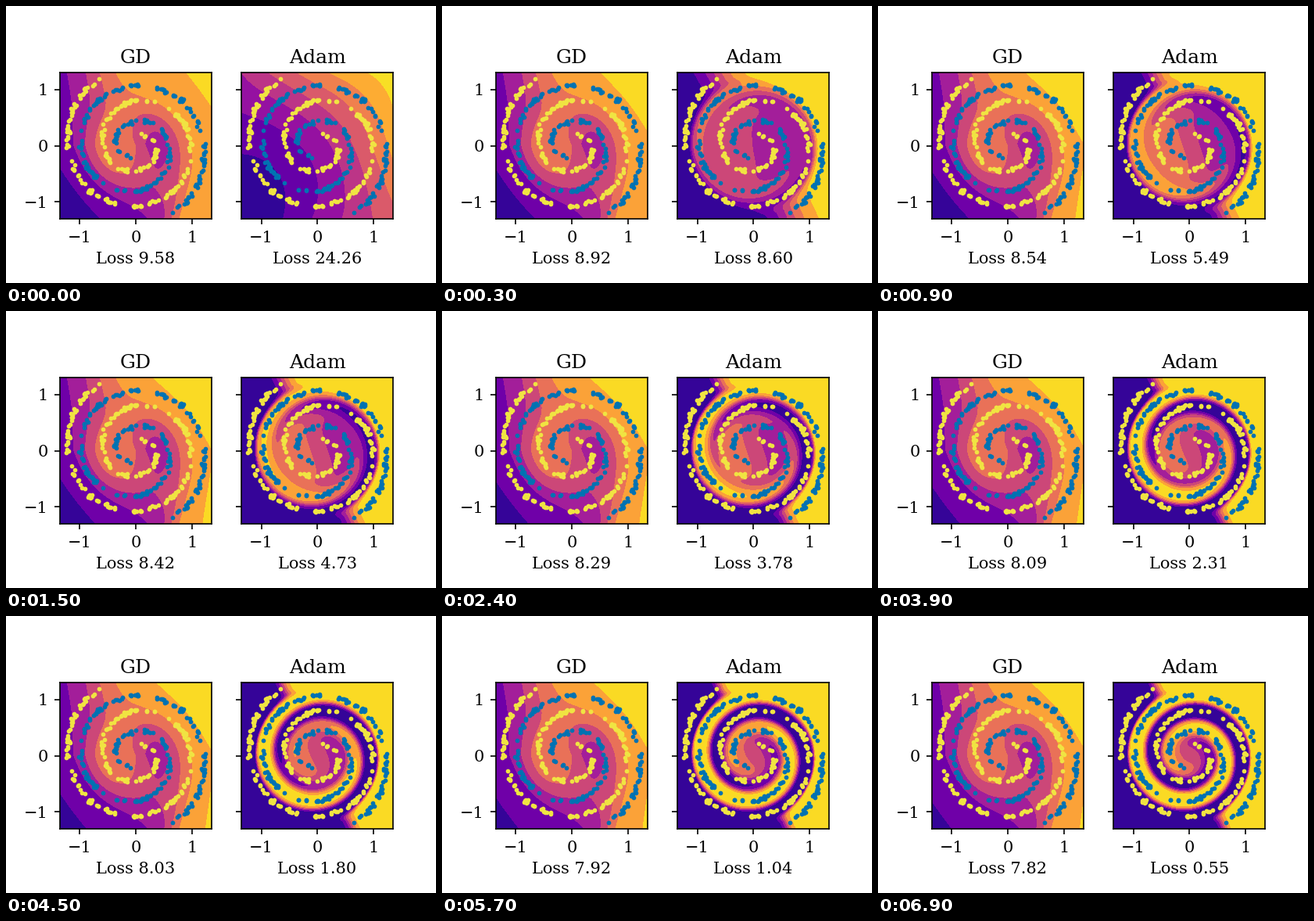
Write a matplotlib script that moves like this. It is 550 px wide and 354 px high and loops after 7200 ms.

```python
import numpy as np
import matplotlib.pyplot as plt
from matplotlib.animation import FuncAnimation

plt.rcParams["font.family"] = "DejaVu Serif"

FRAMES, INTERVAL, DPI = 24, 300, 150
XLIM, YLIM = (-1.354, 1.346), (-1.303, 1.297)
YELLOW, BLUE = "#F0E442", "#0072B2"

# Spiral: radius grows by TURN for each clockwise turn from the top
START, TURN, END = 0.16, 0.625, np.radians(692)

KEYS = [0, 1, 3, 5, 11, 15, 19, 23]
GD_LOSS = [9.58, 8.92, 8.54, 8.42, 8.16, 8.03, 7.92, 7.82]
ADAM_LOSS = [24.26, 8.6, 5.49, 4.73, 2.82, 1.80, 1.04, 0.55]


def sigmoid(z):
    return 1 / (1 + np.exp(-z))


def smoothstep(a, b, v):
    t = np.clip((v - a) / (b - a), 0, 1)
    return t * t * (3 - 2 * t)


def spiral_points(n=200):
    rng = np.random.default_rng(4)
    t = END * rng.random(n) ** 0.7
    r = START + TURN * t / (2 * np.pi) + rng.normal(0, 0.018, n)
    r += 0.04 * np.sin(t) + 0.02 * np.cos(t)
    return r * np.sin(t), r * np.cos(t)


X, Y = np.meshgrid(np.linspace(*XLIM, 120), np.linspace(*YLIM, 120))
R = np.hypot(X, Y)
BEARING = np.arctan2(X, Y)
PHASE = BEARING - 2 * np.pi * (R - START) / TURN


def gd_logits():
    u = 0.3 + 1.1 * X + 1.1 * Y + 0.1 * X**3
    lobe = 1.25 * np.exp(-((R - 0.5) / 0.45) ** 2)
    u -= lobe * np.cos(BEARING - np.radians(70))
    # lower the upper left, raise the lower right
    u -= 0.85 * np.maximum(Y, 0) * sigmoid(-(X + 0.6) / 0.2)
    ridge = sigmoid((X - 0.65 - 0.45 * (Y + 1.3)) / 0.1)
    return u + 1.3 * np.maximum(-Y, 0) * ridge


def adam_start():
    """First Adam surface, in units of colour bands."""
    v = 2.5 + 1.9 * X + 1.35 * Y + 0.69 * X**2 + 0.85 * Y**2
    v -= 0.45 * X**2 * Y**2
    return v - 0.3 * np.maximum(X, 0) * np.maximum(Y, 0)


def adam_logits(loss):
    """The spiral is learnt from the outside in as the loss falls."""
    loss = min(loss, 6)
    reach = 0.25 + 0.65 * np.sqrt(loss / 6)
    gate = sigmoid((R - reach) / 0.1)
    slope = (0.95 * X + 0.3 * Y) * np.exp(-0.4 * R**2)
    arms = -(5 - 0.5 * loss) * np.cos(PHASE)
    inner = (0.15 - 2.1 * slope) * (1 - gate) + arms * gate
    outer = -(21 - 2.2 * loss) * R * np.sin(BEARING - np.radians(154))
    w = smoothstep(1.06, 1.28, R)
    return inner * (1 - w) + outer * w


GD, FIRST = gd_logits(), adam_start()
CUTS = np.log([p / (1 - p) for p in (0.15, 0.3, 0.45, 0.6, 0.75, 0.9)])


def gd_surface(i, loss):
    # the two outermost bands shrink slowly
    cuts = CUTS.copy()
    cuts[0] -= 0.1 + 0.5 * i / FRAMES
    cuts[-1] += 0.8 * np.exp(-i) - 0.2 * (1 - i / FRAMES)
    return GD, cuts


def adam_surface(i, loss):
    if i == 0:
        return FIRST, np.arange(1, 8)
    mix = max(0, 1 - i / 3) ** 2
    u = mix * 0.45 * (FIRST - 4) + (1 - mix) * adam_logits(loss)
    return sigmoid(u), sigmoid(CUTS)


fig, axes = plt.subplots(1, 2, sharey=True, figsize=(550 / DPI, 354 / DPI),
                         dpi=DPI)
px, py = spiral_points()
for ax, name in zip(axes, ("GD", "Adam")):
    ax.set_title(name)
    ax.set(aspect="equal", xlim=XLIM, ylim=YLIM,
           xticks=[-1, 0, 1], yticks=[-1, 0, 1])
    ax.set_autoscale_on(False)
    for sign, color in ((1, YELLOW), (-1, BLUE)):
        ax.scatter(sign * px, sign * py, s=7.5, c=color, linewidths=0,
                   zorder=2)

PANELS = [(axes[0], gd_surface, GD_LOSS), (axes[1], adam_surface, ADAM_LOSS)]
fills = []


def clear():
    while fills:
        fills.pop().remove()
    return []


def update(i):
    clear()
    for ax, surface, losses in PANELS:
        loss = np.interp(i, KEYS, losses)
        z, cuts = surface(i, loss)
        n = len(cuts) + 1
        colors = [plt.cm.plasma((k + 0.5) / n) for k in range(n)]
        fills.append(ax.contourf(X, Y, z, levels=[-99, *cuts, 99],
                                 colors=colors, zorder=0))
        ax.set_xlabel(f"Loss {loss:.2f}")
    return []


anim = FuncAnimation(fig, update, frames=FRAMES, init_func=clear,
                     interval=INTERVAL, repeat=True, repeat_delay=0)
plt.show()
```
